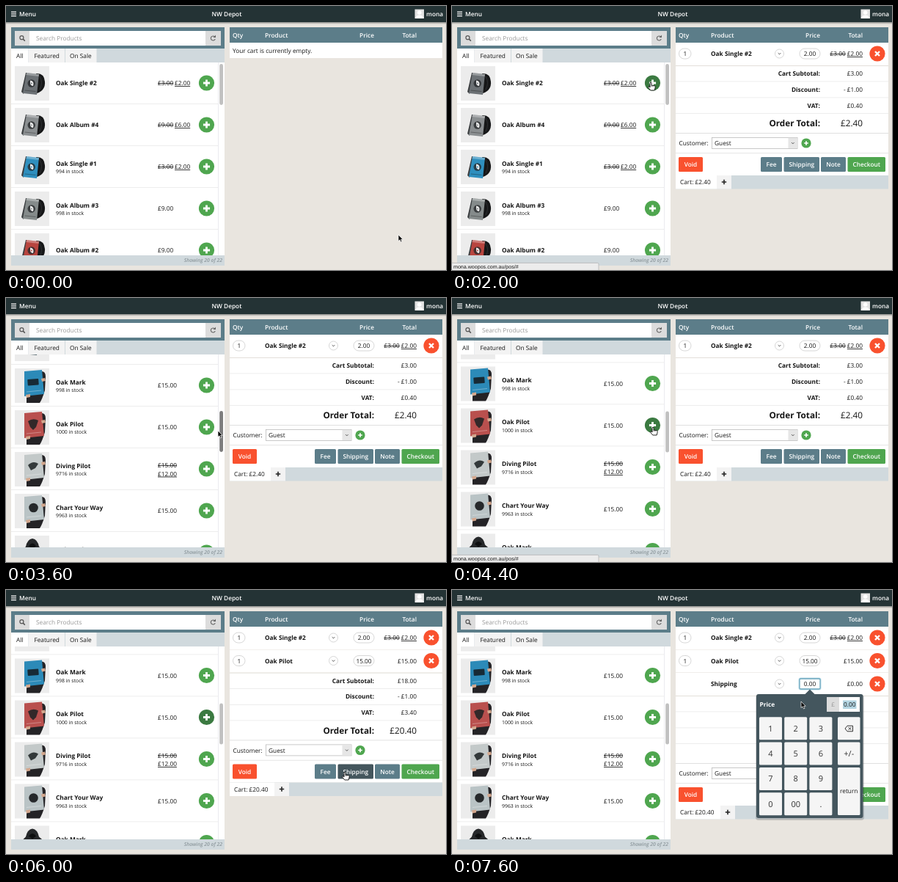
These frames come from a looping animation (600 px wide and 360 px high, 8000 ms). An HTML page:

```html
<!DOCTYPE html>
<html lang="en">
<head>
<meta charset="utf-8">
<title>Point of sale</title>
<style>
html, body { margin: 0; width: 100%; height: 100%; overflow: hidden; background: #e9e5df; }
svg { display: block; width: 600px; height: 360px; }
text { font: 8.3px "Open Sans", "Noto Sans", sans-serif; fill: #161616; white-space: pre; text-rendering: geometricPrecision; }
.b { font-weight: 700; }
.s { font-weight: 600; }
.w { fill: #fff; }
.strike { text-decoration: line-through; }
.under { text-decoration: underline; }
.small { font-size: 6.9px; }
.big { font-size: 11.75px; }
.key { font-size: 11px; fill: #333; }
.note { font-size: 6.8px; font-weight: 600; font-style: italic; fill: #8c979c; }
.hint { fill: #999; }
.url { font: 7.1px "Liberation Sans", Arial, sans-serif; }
</style>
</head>
<body>
<svg id="stage" viewBox="0 0 600 360"></svg>
<script>
const STEP = 400, STEPS = 20;
const TEAL = '#5c7d89', GREEN = '#4fa64f', DARK_GREEN = '#3b7a41', RED = '#f9512e', STRIP = '#d0d9dd';
const stage = document.getElementById('stage');

// name, stock, price, sale price, kind, colour
const products = [
  ['Oak Single #2', '', 3, 2, 'record', '#6c7175'],
  ['Oak Album #4', '', 9, 6, 'record', '#8b8f91'],
  ['Oak Single #1', '994 in stock', 3, 2, 'record', '#2f8fbe'],
  ['Oak Album #3', '998 in stock', 9, 0, 'record', '#858b8b'],
  ['Oak Album #2', '', 9, 0, 'record', '#b8453f'],
  ['Oak Album #1', '997 in stock', 9, 0, 'record', '#4c6068'],
  ['Oak Mark', '998 in stock', 15, 0, 'poster', '#2c8ab8'],
  ['Oak Pilot', '1000 in stock', 15, 0, 'poster', '#b9504e'],
  ['Diving Pilot', '9716 in stock', 15, 12, 'poster', '#c3c9c9'],
  ['Chart Your Way', '9963 in stock', 15, 0, 'poster', '#b9c3c5'],
  ['Oak Mark', '995 in stock', 35, 0, 'hoodie', '#26282a']
];

// pointer positions at chosen steps; in between they are interpolated
const pointerPath = [[0, 535, 312], [1, 535, 312], [3, 272, 104], [5, 271, 104], [7, 291, 116],
  [9, 289, 181], [10, 287, 181], [11, 274, 176], [13, 274, 175], [15, 462, 248], [16, 462, 248],
  [18, 484, 150], [19, 476, 152]];
const scrollPath = [[0, 0], [6, 0], [7, 43.5], [9, 328], [10, 330.5], [19, 330.5]];
const handSteps = [3, 4, 5, 11, 12, 13, 15, 16];

function along(path, s, col) {
  const j = Math.max(1, path.findIndex(p => p[0] >= s));
  const a = path[j - 1], b = path[j];
  return a[col] + (b[col] - a[col]) * (s - a[0]) / (b[0] - a[0]);
}

const money = v => '£' + v.toFixed(2);
const rect = (x, y, w, h, fill, extra = '') =>
  `<rect x="${x}" y="${y}" width="${w}" height="${h}" fill="${fill}" ${extra}/>`;
const circle = (x, y, r, fill, extra = '') =>
  `<circle cx="${x}" cy="${y}" r="${r}" fill="${fill}" ${extra}/>`;
const path = (d, fill, extra = '') => `<path d="${d}" fill="${fill}" ${extra}/>`;
const line = (d, color, width = 1, extra = '') =>
  path(d, 'none', `stroke="${color}" stroke-width="${width}" ${extra}`);
const label = (x, y, str, cls = '', anchor = 'start') =>
  `<text x="${x}" y="${y}" class="${cls}" text-anchor="${anchor}">${str}</text>`;
const group = (x, y, inner, extra = '') => `<g transform="translate(${x} ${y})" ${extra}>${inner}</g>`;
const rule = (x, y, w, color = '#e9e9e9') => rect(x, y, w, 0.8, color);

function plusButton(x, y, r, fill) {
  const k = r * 0.43;
  return circle(x, y, r, fill) + line(`M${x - k} ${y}h${2 * k}M${x} ${y - k}v${2 * k}`, '#fff', r * 0.26);
}

function chevron(x, y) {
  return line(`M${x - 1.8} ${y - 0.9}l1.8 1.8l1.8 -1.8`, '#555', 1);
}

function recordArt(color) {
  return path('M29 10Q40 9 41 21Q42 33 30 37Z', '#161718') +
    line('M34 14Q39 22 34 32', '#3a3d3f', 0.7) +
    path('M9 35L15 9L17 9L12 38Z', '#3b3e40') +
    path('M16 9L33 11L30 39L11 37Z', color) +
    path('M16 9L33 11L32.7 14L15.4 12Z', '#fff', 'opacity=".3"') +
    circle(22.7, 23.5, 5.2, '#25282a', 'opacity=".8"') +
    path('M21 19.5Q27 20 25 27Q22 27 21 24Z', '#ededed') + circle(22.7, 23.5, 1, color) +
    line('M13.5 33l15 1.5', '#111', 1, 'opacity=".35"');
}

function posterArt(color, i) {
  const marks = [rect(17.5, 14.5, 15, 8.5, '#172a35', 'rx="1" transform="rotate(-4 25 19)"'),
    path('M18 15Q25 10 32 14L29 23L25 27L21 23Z', '#332829'),
    path('M18 18Q25 11 32 16L28 22L22 25Z', '#33393a'), circle(25.5, 19, 6.3, '#26292b')];
  return path('M35 4Q42 3 42 11L41 30Q37 43 34 47H16V36L32 31Z', '#242326') +
    path('M13 4L37 2L40 35L13 38Z', color) +
    path('M36 14l5 -1l1 4l-5 1zM15 36l6 -1l0 4l-5 1z', '#d3a78d') +
    marks[i] + line('M16 32l20 -2', '#fff', 0.8, 'opacity=".4"');
}

function art(kind, color, i) {
  const inner = kind === 'record' ? recordArt(color) : kind === 'poster' ? posterArt(color, i - 6) :
    path('M15 15Q17 5 24 4Q31 5 33 15L40 21L42 47H6L9 21Z', color) + path('M19 14Q24 7 29 14L24 18Z', '#0e0f10');
  return rect(0, 0, 47, 47, '#ececec') + inner;
}

function productRow(item, i, scroll, s) {
  const [name, stock, price, sale, kind, color] = item;
  const y = 105 + 57 * i - scroll;
  if (y < 45 || y > 375) return '';
  const pressed = (i === 0 && s >= 3 && s < 8) || (i === 7 && s >= 11 && s < 16);
  const wide = price > 9;
  let out = group(12, y - 23, art(kind, color, i)) +
    label(68, y + (stock ? -1.2 : 3.1), name, 'b') + (stock ? label(68, y + 9.2, stock, 'small') : '');
  if (sale) {
    out += label(207, y + (wide ? -2 : 3.1), money(price), 'strike') +
      label(wide ? 207 : 230, y + (wide ? 9.6 : 3.1), money(sale), 'under');
  } else out += label(207, y + 3.1, money(price));
  return out + plusButton(273.5, y, 10.6, pressed ? DARK_GREEN : GREEN) + rule(7, y + 28, 282);
}

function topBar() {
  return rect(0, 22, 600, 3, 'url(#shade)') + rect(0, 0, 600, 22, '#243335') +
    line('M7 8.2h7M7 10.9h7M7 13.6h7', '#fff', 1.3) + label(18, 14, 'Menu', 's w') +
    label(301, 13.8, 'NW Depot', 's w', 'middle') +
    rect(557.5, 4.5, 12.5, 12.5, '#e3e3e3') + circle(563.7, 9, 2.8, '#fff') +
    path('M558 17Q559 12.5 563.7 12.5Q568.5 12.5 569.5 17Z', '#fff') + label(573, 13.8, 'mona', 's w');
}

function catalogue(s) {
  const scroll = along(scrollPath, s, 1);
  const drag = s >= 7 && s <= 9;
  return rect(7, 29, 291, 325, '#fff') + rect(7, 29, 291, 29, TEAL) +
    rect(12, 34, 281, 20, '#fff', 'rx="1.5"') + rect(12, 34, 20, 20, '#dcdcdc') + rect(272, 34, 21, 20, '#dcdcdc') +
    circle(21.4, 43.2, 2.5, 'none', 'stroke="#555" stroke-width="1.2"') + line('M23.3 45.1l2.5 2.5', '#555', 1.5) +
    line('M284.5 41.8A3 3 0 1 0 285.2 45', '#666', 1.1) + path('M286 39.6v3.5h-3.5z', '#666') +
    label(41, 46.9, 'Search Products', 'hint') +
    rect(7, 58, 291, 19, STRIP) + rect(7, 58, 23.5, 19, '#fff') + rect(31, 58, 49, 19, '#f3f3f3') +
    rect(81, 58, 42.5, 19, '#f3f3f3') +
    label(14, 70.9, 'All') + label(38.4, 70.9, 'Featured') + label(87, 70.9, 'On Sale') +
    `<g clip-path="url(#list)">${products.map((p, i) => productRow(p, i, scroll, s)).join('')}</g>` +
    rect(289, 77, 0.8, 263, '#e6e6ec') +
    rect(291.2, 79 + scroll * 0.2287, 4.8, 56, drag ? '#7d7d7d' : '#c1c1c1', 'rx="2.4"') +
    rect(7, 340, 291, 14, STRIP) + label(295, 349.4, 'Showing 20 of 22', 'note', 'end');
}

function pill(x, y, w, str, focus) {
  const edge = focus ? 'rx="1.5" stroke="#6ba7bd" stroke-width="1.3"' : 'rx="7" stroke="#ccc" stroke-width=".8"';
  return (focus ? rect(x - 1.5, y - 8.5, w + 3, 17, '#b9dbe8', 'rx="3"') : '') +
    rect(x, y - 7, w, 14, '#fff', edge) + label(x + w / 2, y + 3.1, str, '', 'middle');
}

function cartLine(i, s, item) {
  const top = 50 + 31.5 * i, y = top + 15;
  const fresh = s === 12 && i === 1;
  const total = item.old ?
    `<tspan class="strike">${money(item.old)}</tspan> <tspan class="under">${money(item.price)}</tspan>` : money(item.price);
  return rect(305, top, 290, 31.5, fresh ? '#eeeeee' : '#fff') +
    (item.qty ? pill(309.5, y, 16.5, '1') : '') + label(353, y + 3.1, item.name, 'b') +
    circle(446.5, y, 6, '#fff', 'stroke="#ccc" stroke-width=".8"') + chevron(446.5, y) +
    pill(474, y, 28, item.price.toFixed(2), item.name === 'Shipping' && s >= 18) +
    label(560, y + 3.1, total, '', 'end') + circle(580, y, 10.6, RED) +
    line(`M577 ${y - 3}l6 6m0 -6l-6 6`, '#fff', 2.4) + rule(305, top + 31, 290, '#e2ddd6');
}

function button(x, w, str, fill) {
  return rect(x, 206, w, 20, fill, 'rx="1.5"') + label(x + w / 2, 219, str, 's w', 'middle');
}

function cartTail(s, count) {
  const many = count > 1;
  const sums = many ? [18, 3.4, 20.4] : [3, 0.4, 2.4];
  const sumRow = (y, name, val, cls = '') => label(502, y, name, 'b ' + cls, 'end') + label(560, y, val, cls, 'end');
  const tab = many ? 366 : 361;
  return rect(305, 81.5, 290, 149.5, '#fff') + rule(305, 81, 290, '#d5cfc7') +
    sumRow(95.2, 'Cart Subtotal:', money(sums[0])) + rule(305, 102.5, 290) +
    sumRow(116.8, 'Discount:', '- £1.00') + rule(305, 124.5, 290) +
    sumRow(138.6, 'VAT:', money(sums[1])) + rule(305, 146, 290) +
    sumRow(164.2, 'Order Total:', money(sums[2]), 'big') + rule(305, 173, 290, '#d9d9d9') +
    label(309.5, 190, 'Customer:') +
    rect(354.4, 179.4, 116.6, 15, '#fff', 'stroke="#bbb" stroke-width=".8"') +
    rect(458.5, 179.8, 12.2, 14.2, '#e6e6e6') + chevron(464.8, 187) + label(358, 190, 'Guest') +
    plusButton(483, 187, 6.6, GREEN) + rule(305, 200.3, 290, '#dedede') +
    button(309, 33, 'Void', RED) + button(421, 29, 'Fee', TEAL) +
    button(452.5, 48.5, 'Shipping', s === 15 || s === 16 ? '#44565d' : TEAL) +
    button(503, 34, 'Note', TEAL) + button(539.5, 51.5, 'Checkout', GREEN) +
    rect(305, 231, 290, 18.5, STRIP) + rect(305, 231, tab - 305, 18.5, '#fff') + rect(tab, 231, 20, 18.5, '#f3f3f3') +
    label(311, 243.1, 'Cart: ' + money(sums[2])) +
    line(`M${tab + 6.8} 240h6.4M${tab + 10} 236.8v6.4`, '#222', 1.6);
}

function cart(s) {
  const head = rect(305, 29, 290, 21, TEAL) + label(309, 43, 'Qty', 's w') + label(353, 43, 'Product', 's w') +
    label(502, 43, 'Price', 's w', 'end') + label(560, 43, 'Total', 's w', 'end');
  if (s < 5) return head + rect(305, 50, 290, 21, '#fff') + label(309, 63.6, 'Your cart is currently empty.');
  const items = [{ name: 'Oak Single #2', qty: 1, price: 2, old: 3 }];
  if (s >= 12) items.push({ name: 'Oak Pilot', qty: 1, price: 15 });
  if (s >= 17) items.push({ name: 'Shipping', price: 0 });
  return head + group(0, 31.5 * (items.length - 1), cartTail(s, items.length)) +
    items.map((item, i) => cartLine(i, s, item)).join('');
}

function keypad() {
  const key = (x, y, w, h, str, cls = 'key') =>
    rect(x, y, w, h, '#f5f5f5', 'rx="1.5"') + label(x + w / 2, y + h / 2 + (cls ? 4 : 2.9), str, cls, 'middle');
  const digits = ['1', '2', '3', '4', '5', '6', '7', '8', '9', '0', '00', '.'];
  return rect(414, 143, 148, 171, '#000', 'rx="4" opacity=".16"') +
    path('M481 142.5L488 135.5L495 142.5Z', '#44565e') + rect(415, 142, 145.5, 169, '#44565e', 'rx="3"') +
    label(419.5, 159, 'Price', 'b w') + rect(511, 146, 17, 20, '#dcdcdc') + rect(528, 146, 28, 20, '#fff') +
    label(519.5, 159, '£', 'hint', 'middle') + rect(533, 150.5, 18.5, 11.5, '#b4d5e2') +
    label(542.3, 159, '0.00', '', 'middle') +
    digits.map((d, i) => key(419 + 34.2 * (i % 3), 173.3 + 34.3 * Math.floor(i / 3), 31, 31, d)).join('') +
    key(526, 173.3, 30.5, 31, '') + key(526, 207.6, 30.5, 31, '+/-') + key(526, 242, 30.5, 65, 'return', '') +
    line('M536 189l3 -3.8h7.5v7.6h-7.5zM540.7 187.2l3.6 3.6m0 -3.6l-3.6 3.6', '#333', 1);
}

function statusBar(s) {
  const shown = (s >= 3 && s <= 6) || (s >= 11 && s <= 14);
  if (!shown) return '';
  return `<g opacity="${s === 14 ? 0.5 : 1}">` + rect(-1, 350.4, 201, 11, '#ececec', 'rx="1.5" stroke="#b5b5b5" stroke-width=".8"') +
    label(2, 358, 'mona.woopos.com.au/pos/#', 'url') + '</g>';
}

function pointer(s) {
  const shape = handSteps.includes(s) ?
    path('M-1 .8Q0 -.6 1 .8V4L5.2 4.8Q6.4 5.2 6.2 6.8L5.2 11H-.2L-3.4 7.2Q-3.8 5.6 -2.4 6L-1 7Z', '#fff',
      'stroke="#111" stroke-width=".9"') + line('M1 4v2M3 4.6v1.6', '#111', 0.6) :
    path('M0 0V8.6L2 6.8L3.5 10L5 9.3L3.6 6.3H6.2Z', '#000', 'stroke="#fff" stroke-width=".7"');
  return group(along(pointerPath, s, 1), along(pointerPath, s, 2), shape);
}

const defs = `<defs><clipPath id="list">${rect(7, 77, 291, 263, '#000')}</clipPath>
  <linearGradient id="shade" x2="0" y2="1"><stop stop-color="#8f918e"/><stop offset="1" stop-color="#e9e5df"/></linearGradient></defs>`;

function draw(s) {
  stage.innerHTML = defs + rect(0, 0, 600, 360, '#e9e5df') + topBar() + catalogue(s) + cart(s) +
    (s >= 18 ? keypad() : '') + statusBar(s) + pointer(s);
}

let start = null, last = -1;
function tick(now) {
  if (start === null) start = now;
  const s = Math.floor((now - start) / STEP) % STEPS;
  if (s !== last) draw(last = s);
  requestAnimationFrame(tick);
}
draw(0);
requestAnimationFrame(tick);
</script>
</body>
</html>
```
